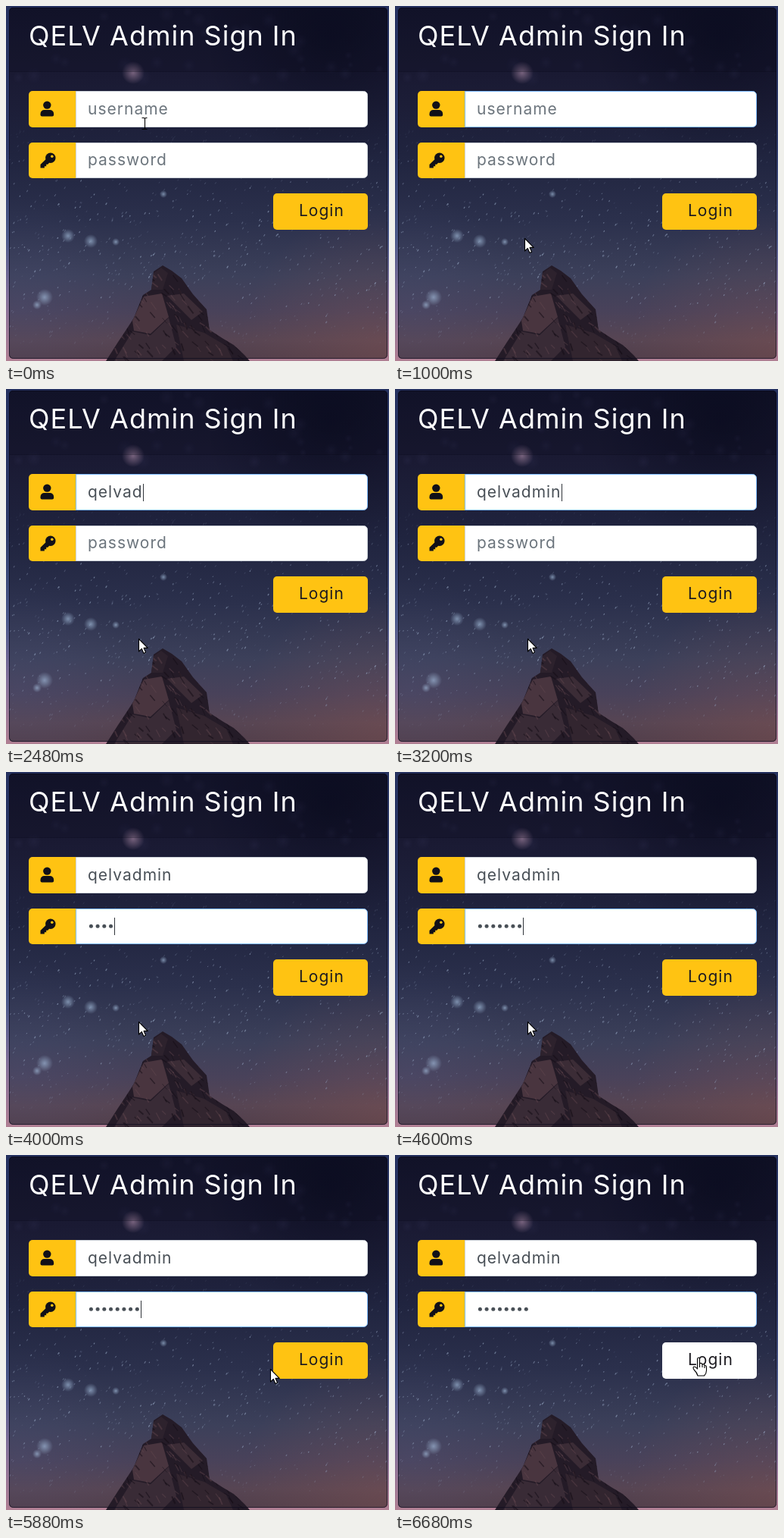
Recreate the animation shown at these times as an HTML page with a canvas. Size 506 by 468 pixels, loop 6.8 s.

```html
<!DOCTYPE html>
<html lang="en">
<head>
<meta charset="utf-8">
<title>Sign in</title>
<style>
  html, body { margin: 0; width: 506px; height: 468px; overflow: hidden; background: #191a30; }
  canvas { display: block; }
</style>
</head>
<body>
<canvas id="stage" width="506" height="468"></canvas>
<script>
const W = 506, H = 468, LOOP = 6800;
const YELLOW = '#ffc312', INK = '#111018';
const LOGIN = 'qelvadmin';
const USER_FOCUS = 400, USER_TYPING = 1400, PASS_FOCUS = 3280, PASS_TYPING = 3400;
const KEY_GAP = 200, PASS_LENGTH = 8, BLINK = 500;

// Pointer stops: time, x, y
const PATH = [
  [0, 183, 155], [400, 183, 155], [880, 171, 303], [1000, 171, 306],
  [1400, 175, 329], [5080, 175, 329], [5280, 194, 327], [6080, 401, 267], [LOOP, 401, 267]
];

const ctx = document.getElementById('stage').getContext('2d');
const clamp = (v, lo, hi) => Math.max(lo, Math.min(hi, v));

function box(c, x, y, w, h, radius, fill, stroke) {
  c.beginPath();
  c.roundRect(x, y, w, h, radius);
  if (fill) { c.fillStyle = fill; c.fill(); }
  if (stroke) { c.strokeStyle = stroke; c.lineWidth = 1; c.stroke(); }
}

function polygon(c, points, fill) {
  c.beginPath();
  points.forEach(([x, y]) => c.lineTo(x, y));
  c.closePath();
  c.fillStyle = fill;
  c.fill();
}

function disc(c, x, y, r, fill) {
  c.beginPath();
  c.arc(x, y, r, 0, Math.PI * 2);
  c.fillStyle = fill;
  c.fill();
}

function glow(c, x, y, r, rgb, alpha) {
  const g = c.createRadialGradient(x, y, 0, x, y, r);
  g.addColorStop(0, `rgba(${rgb},${alpha})`);
  g.addColorStop(0.4, `rgba(${rgb},${alpha * 0.6})`);
  g.addColorStop(1, `rgba(${rgb},0)`);
  c.fillStyle = g;
  c.fillRect(x - r, y - r, r * 2, r * 2);
}

function vertical(c, stops) {
  const g = c.createLinearGradient(0, 0, 0, H);
  stops.forEach(([at, color]) => g.addColorStop(at, color));
  return g;
}

function label(c, text, x, y, size, color, spacing = 1) {
  c.font = `${size}px Inter, Roboto, sans-serif`;
  c.letterSpacing = spacing + 'px';
  c.fillStyle = color;
  c.fillText(text, x, y);
  return c.measureText(text).width;
}

function seeded(seed) {
  return () => (seed = (seed * 16807) % 2147483647) / 2147483647;
}

function drawSky(c) {
  c.fillStyle = vertical(c, [[0, '#25315f'], [0.4, '#2f3b6a'], [0.65, '#4c598a'], [0.82, '#83719a'], [1, '#b07f93']]);
  c.fillRect(0, 0, W, H);
  c.save();
  c.beginPath();
  c.roundRect(4, 2, 500, 463, 5);
  c.clip();
  c.fillStyle = vertical(c, [
    [0, '#14152c'], [0.2, '#1a1a33'], [0.42, '#20243f'], [0.6, '#2b304c'],
    [0.76, '#3c405a'], [0.86, '#49425a'], [0.94, '#574553'], [1, '#513e4a']
  ]);
  c.fillRect(0, 0, W, H);
  glow(c, 500, 450, 190, '145,88,82', 0.3);
  glow(c, 20, 400, 150, '80,84,125', 0.25);
  glow(c, 430, 40, 170, '4,6,22', 0.45);

  const rand = seeded(4127);
  for (let i = 0; i < 30; i++) {
    glow(c, rand() * W, rand() * 110, 4 + rand() * 8, '75,75,120', 0.12);
  }
  c.lineCap = 'round';
  for (let i = 0; i < 850; i++) {
    const x = rand() * W, y = 160 + rand() * 285;
    const size = 0.4 + rand() * 1.6;
    const fade = clamp((y - 140) / 110, 0.2, 1) * clamp((460 - y) / 70, 0.1, 1);
    c.strokeStyle = `rgba(155,172,200,${fade * (0.15 + rand() * 0.5)})`;
    c.lineWidth = 0.6 + rand() * 0.7;
    c.beginPath();
    c.moveTo(x, y);
    c.lineTo(x - size * 0.6, y + size);
    c.stroke();
  }
  [[82, 303, 9], [112, 310, 9], [51, 384, 11], [41, 394, 6], [145, 311, 5], [208, 248, 5]]
    .forEach(([x, y, r]) => glow(c, x, y, r, '165,190,220', 0.65));
  glow(c, 168, 88, 15, '150,122,150', 0.75);
  c.restore();
}

function drawMountain(c) {
  const outline = [
    [132, 468], [148, 443], [160, 425], [169, 411], [181, 381], [192, 374], [195, 350],
    [207, 342], [219, 349], [232, 359], [247, 380], [265, 400], [269, 427],
    [286, 438], [301, 447], [315, 460], [322, 468]
  ];
  polygon(c, outline, '#241b27');
  polygon(c, [[195, 352], [205, 345], [214, 352], [207, 374], [192, 374]], '#2d222d');
  polygon(c, [[182, 383], [206, 379], [215, 410], [191, 432], [169, 428], [167, 415]], '#49353f');
  polygon(c, [[167, 429], [191, 434], [215, 411], [225, 449], [206, 468], [143, 468]], '#392b36');
  polygon(c, [[213, 382], [235, 379], [260, 403], [245, 414]], '#3b2c36');
  polygon(c, [[225, 420], [262, 431], [291, 448], [300, 468], [235, 468]], '#32252f');

  const rand = seeded(913);
  c.save();
  c.beginPath();
  outline.forEach(([x, y]) => c.lineTo(x, y));
  c.clip();
  for (let i = 0; i < 150; i++) {
    const x = 135 + rand() * 180, y = 352 + rand() * 116;
    c.strokeStyle = rand() < 0.6 ? 'rgba(20,14,23,.55)' : 'rgba(105,76,84,.4)';
    c.lineWidth = 0.7 + rand() * 1.4;
    c.beginPath();
    c.moveTo(x, y);
    c.lineTo(x + 3 + rand() * 5, y + 4 + rand() * 6);
    c.stroke();
  }
  c.restore();
}

function drawUserIcon(c) {
  disc(c, 54.3, 130.6, 5.2, INK);
  box(c, 45.5, 137, 17.6, 8.6, [5, 5, 2, 2], INK);
}

function drawKeyIcon(c) {
  disc(c, 58.8, 200.2, 6.7, INK);
  polygon(c, [
    [53.2, 201.5], [45.5, 209], [45.5, 213.6], [50.8, 213.6], [50.8, 211.3],
    [53.2, 211.3], [53.2, 208.8], [55.3, 208.8], [58, 205.6]
  ], INK);
  disc(c, 60.8, 198.3, 1.8, YELLOW);
}

function makeBackdrop() {
  const layer = document.createElement('canvas');
  layer.width = W;
  layer.height = H;
  const c = layer.getContext('2d');
  drawSky(c);
  drawMountain(c);
  box(c, 4, 2, 500, 84, [5, 5, 0, 0], 'rgba(8,8,26,.18)');
  c.fillStyle = 'rgba(5,5,18,.3)';
  c.fillRect(4, 86, 500, 1);
  box(c, 4.5, 2.5, 499, 462, 5, null, 'rgba(10,10,28,.65)');
  label(c, 'QELV Admin Sign In', 30, 52, 36, '#fff');
  return layer;
}

function drawField(y, h, focused, icon) {
  box(ctx, 30, y, 62.5, h, [5, 0, 0, 5], YELLOW);
  box(ctx, 92.5, y + 0.5, 385, h - 1, [0, 5, 5, 0], '#fff', focused ? '#80bdff' : '#ced4da');
  icon(ctx);
}

function drawCaret(x, y, time, since) {
  if (Math.floor((time - since) / BLINK) % 2) return;
  ctx.fillStyle = '#30343a';
  ctx.fillRect(Math.round(x), y, 1, 23);
}

function typed(time, start, max) {
  return clamp(Math.floor((time - start) / KEY_GAP) + 1, 0, max);
}

function lastKey(count, start, focus) {
  return count ? start + (count - 1) * KEY_GAP : focus;
}

function drawForm(time, hover) {
  const userFocused = time >= USER_FOCUS && time < PASS_FOCUS;
  const passFocused = time >= PASS_FOCUS;
  drawField(112, 48, userFocused, drawUserIcon);
  drawField(180, 47, passFocused, drawKeyIcon);

  const letters = typed(time, USER_TYPING, LOGIN.length);
  const width = letters
    ? label(ctx, LOGIN.slice(0, letters), 108, 143, 21, '#495057')
    : (label(ctx, 'username', 108, 143, 21, '#6c757d'), 0);
  if (userFocused) drawCaret(108 + width, 125, time, lastKey(letters, USER_TYPING, USER_FOCUS));

  const dots = typed(time, PASS_TYPING, PASS_LENGTH);
  if (!dots) label(ctx, 'password', 108, 210, 21, '#6c757d');
  for (let i = 0; i < dots; i++) disc(ctx, 112.4 + i * 8.7, 203.3, 2.5, '#495057');
  if (passFocused) drawCaret(108 + dots * 8.7, 192, time, lastKey(dots, PASS_TYPING, PASS_FOCUS));

  box(ctx, 353, 247, 125, 48, 5, hover ? '#fff' : YELLOW);
  label(ctx, 'Login', 387, 277, 21, '#1c1a20');
}

function pointerAt(time) {
  const i = PATH.findIndex(stop => stop[0] > time);
  const [t0, x0, y0] = PATH[i - 1], [t1, x1, y1] = PATH[i];
  const p = (time - t0) / (t1 - t0);
  return [x0 + (x1 - x0) * p, y0 + (y1 - y0) * p];
}

function drawPointer(x, y, kind) {
  ctx.save();
  ctx.translate(Math.round(x), Math.round(y));
  ctx.lineJoin = 'round';
  ctx.lineWidth = 1.1;
  ctx.strokeStyle = '#000';
  ctx.fillStyle = '#fff';
  const shapes = {
    arrow: 'M.5 .5V17L4.3 13.4L7 19.4L9.6 18.2L7 12.4H12.2Z',
    hand: 'M-1.5 1.5Q0 -1.5 1.5 1.5V8Q4 6.5 5 9Q7.5 8 8 10.5Q10.5 10 10.5 13V17Q10.5 21 7.5 24H-1Q-2 20 -6 16Q-8 13 -6 12Q-4 11.5 -1.5 15Z',
    text: 'M-3.5 -7.5H-1Q.5 -7.5 .5 -6V6Q.5 7.5 -1 7.5H-3.5M3.5 -7.5H2Q.5 -7.5 .5 -6M.5 6Q.5 7.5 2 7.5H3.5'
  };
  const shape = new Path2D(shapes[kind]);
  if (kind !== 'text') ctx.fill(shape);
  ctx.stroke(shape);
  if (kind === 'hand') ctx.stroke(new Path2D('M1.5 8V13M5 9V13M8 10.5V14'));
  ctx.restore();
}

const backdrop = makeBackdrop();
const within = (x, y, left, top, right, bottom) => x >= left && x < right && y >= top && y < bottom;

function render(now) {
  // Pictures alternate between 80 and 120 ms.
  const elapsed = now % LOOP;
  const pair = Math.floor(elapsed / 200) * 200;
  const time = pair + (elapsed - pair >= 80 ? 80 : 0);
  const [x, y] = pointerAt(time);
  const hover = within(x, y, 353, 247, 478, 295);
  const overText = within(x, y, 92, 112, 478, 160) || within(x, y, 92, 180, 478, 227);
  ctx.drawImage(backdrop, 0, 0);
  drawForm(time, hover);
  drawPointer(x, y, hover ? 'hand' : overText ? 'text' : 'arrow');
}

const start = performance.now();
function tick() {
  render(performance.now() - start);
  requestAnimationFrame(tick);
}
tick();
</script>
</body>
</html>
```
